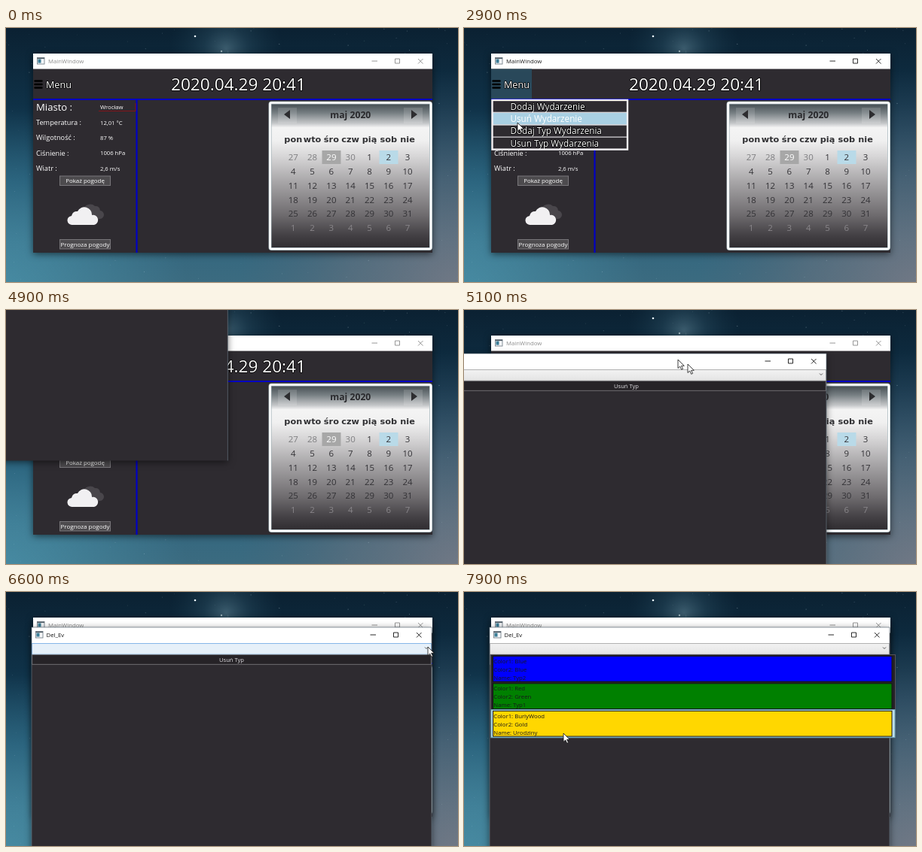
An HTML page that plays this animation: 600 px wide and 338 px high, repeating every 8 s.

```html
<!DOCTYPE html>
<html lang="pl">
<head>
<meta charset="utf-8">
<style>
html, body { margin: 0; width: 100%; height: 100%; overflow: hidden; background: #0c2333; }
svg { display: block; width: 100vw; height: 100vh; }
text { font-family: "Open Sans", "Noto Sans", sans-serif; white-space: pre; }
.days { font-family: "DejaVu Sans", sans-serif; font-weight: bold; }
.outlined { paint-order: stroke; stroke: #000; stroke-width: 1.6px; stroke-linejoin: round; }
.shadow { filter: drop-shadow(0 2px 5px rgba(0,0,0,.55)); }
</style>
</head>
<body>
<svg id="stage" viewBox="0 0 600 338" preserveAspectRatio="none"></svg>
<script>
const LOOP = 8000, STEP = 100;
const BODY = '#2e2b30';
const stage = document.getElementById('stage');

const rect = (x, y, w, h, fill, extra = '') =>
  `<rect x="${x}" y="${y}" width="${w}" height="${h}" fill="${fill}" ${extra}/>`;
const text = (x, y, size, label, fill = '#fff', extra = '') =>
  `<text x="${x}" y="${y}" font-size="${size}" fill="${fill}" ${extra}>${label}</text>`;
const line = (d, color, width = 1, extra = '') =>
  `<path d="${d}" fill="none" stroke="${color}" stroke-width="${width}" ${extra}/>`;
const group = (id, content, extra = '') => `<g id="${id}" ${extra}>${content}</g>`;
const stops = list => list.map(([at, color, alpha = 1]) =>
  `<stop offset="${at}" stop-color="${color}" stop-opacity="${alpha}"/>`).join('');
const vertical = (id, list) =>
  `<linearGradient id="${id}" x1="0" y1="0" x2="0" y2="1">${stops(list)}</linearGradient>`;
const radial = (id, cx, cy, r, list) =>
  `<radialGradient id="${id}" gradientUnits="userSpaceOnUse" cx="${cx}" cy="${cy}" r="${r}">${stops(list)}</radialGradient>`;
const MID = 'text-anchor="middle"';

function seeded(seed) {
  return () => (seed = (seed * 16807) % 2147483647) / 2147483647;
}

const defs = `<defs>
  ${vertical('sky', [[0, '#0b2132'], [.3, '#0f3147'], [.6, '#1e506b'], [.85, '#34677f'], [1, '#3b6b80']])}
  ${radial('teal', 0, 350, 240, [[0, '#4a93ab', .8], [1, '#4a93ab', 0]])}
  ${radial('dusk', 600, 345, 290, [[0, '#777a86', .9], [.5, '#68707d', .55], [1, '#526275', 0]])}
  ${radial('galaxy', 292, 28, 75, [[0, '#5c8192', .6], [.4, '#32596d', .35], [1, '#1a3d50', 0]])}
  ${vertical('calendar', [[0, '#3f484d'], [.07, '#777f83'], [.14, '#c4c6c8'], [.17, '#f4f4f4'], [.26, '#f0f0f0'],
    [.37, '#d6d5d6'], [.55, '#a5a3a5'], [.77, '#6e6b6e'], [.9, '#454246'], [1, '#2e2b2f']])}
  ${vertical('combo', [[0, '#f2f2f2'], [1, '#e4e4e4']])}
</defs>`;

function background() {
  const rand = seeded(77);
  const star = () => {
    const x = rand() * 600, y = rand() ** 1.4 * 338;
    return `<circle cx="${x.toFixed(1)}" cy="${y.toFixed(1)}" r="${(.25 + rand() * .35).toFixed(2)}" opacity="${(.15 + rand() * .4).toFixed(2)}"/>`;
  };
  const layers = ['sky', 'teal', 'dusk', 'galaxy'].map(id => rect(0, 0, 600, 338, `url(#${id})`)).join('');
  return layers + `<g fill="#cfe6ef">${Array.from({ length: 170 }, star).join('')}</g>
    <circle cx="251" cy="11" r="1.3" fill="#eef8fb"/>
    <circle cx="286" cy="31" r="1.2" fill="#c8dbe0" opacity=".7"/>`;
}

// Icon, title and the three window buttons, relative to the window corner.
function titleBar(title, titleX, color) {
  const icon = rect(5.5, 5.5, 9.5, 8.5, '#f4f6f8', 'stroke="#68747d" stroke-width=".8"') +
    rect(6.5, 7.5, 4, 5, '#3b7d96') + rect(5.5, 5.5, 9.5, 1.6, '#56636c');
  return icon + text(titleX, 13.2, 7.75, title, color) +
    line('M449.5 10h7.5M480.5 7h6v6h-6zM511 7l6.5 6.5M517.5 7l-6.5 6.5', color, .9);
}

function weatherPanel() {
  const rows = [
    ['Temperatura :', '12,01 °C', 129], ['Wilgotność :', '87 %', 149.3],
    ['Ciśnienie :', '1006 hPa', 169.7], ['Wiatr :', '2,6 m/s', 190]
  ];
  const button = (y, h, label, size) =>
    rect(71.5, y, 67, h, '#4d4b4e', 'stroke="#78767a" stroke-width="1"') + text(105, y + 9.2, size, label, '#fff', MID);
  return text(40, 110, 13.1, 'Miasto :') + text(125, 108.3, 7.7, 'Wrocław') +
    line('M123 110.5H172V100', '#8d1218', .9) +
    rows.map(([name, value, y]) => text(40, y, 9.2, name) + text(125, y - .5, 7.7, value)).join('') +
    button(197, 12.5, 'Pokaż pogodę', 7.9) + button(281.5, 12.5, 'Prognoza pogody', 8) +
    `<path d="M106 254a7 7 0 0 1-3-12a9 9 0 0 1 15-5a6 6 0 0 1 7 6a5.500 5.500 0 0 1-1 11z" fill="#49464b"/>
     <path d="M88 262a6 6 0 0 1-1-12a7 7 0 0 1 8-6a10 10 0 0 1 19 5a6.600 6.600 0 0 1 3 13z" fill="#f1f0f2"/>`;
}

function calendar() {
  const colX = i => 381.3 + i * 25.3;
  const names = ['pon', 'wto', 'śro', 'czw', 'pią', 'sob', 'nie'];
  let out = rect(350.5, 99.5, 213.5, 194.5, 'url(#calendar)', 'rx="2" stroke="#9fb0b6" stroke-width="4"') +
    rect(350.5, 99.5, 213.5, 194.5, 'none', 'rx="2" stroke="#fff" stroke-width="2.6"') +
    rect(361, 106, 25, 21, '#fff', 'opacity=".13"') + rect(528, 106, 25, 21, '#fff', 'opacity=".13"') +
    '<path d="M377 109v12l-8-6zM538 109v12l8-6z" fill="#2d2d30"/>' +
    text(457.3, 120.2, 12.2, 'maj 2020', '#29292c', MID + ' font-weight="bold"') +
    names.map((name, i) => text(colX(i), 152.3, 11.3, name, '#303033', MID + ' class="days"')).join('') +
    rect(419.5, 163, 25, 18, '#a7a7a7') + rect(495.5, 163, 25, 18, '#b9dae8');
  for (let i = 0; i < 42; i++) {
    const day = (i + 26) % 30 + 1;
    const label = i < 4 ? day : i < 35 ? i - 3 : i - 34;
    const color = i === 2 ? '#fff' : i < 4 ? '#7e7e80' : i < 35 ? '#333236' : '#89868a';
    out += text(colX(i % 7), 176.4 + Math.floor(i / 7) * 18.7, 11.5, label, color, MID);
  }
  return out;
}

function mainWindow() {
  return rect(36, 34, 530, 265, BODY, 'class="shadow"') + rect(36, 34, 530, 20.5, '#fff') +
    group('mainIdle', titleBar('MainWindow', 20, '#8c8c8c'), 'transform="translate(36 34)"') +
    group('mainActive', titleBar('MainWindow', 20, '#1a1a1a'), 'transform="translate(36 34)"') +
    rect(36, 54.5, 54, 39.5, '#29485a', 'id="menuHover"') +
    line('M38.500 70.500h9M38.500 75h9M38.500 79.500h9', '#000', 2.5, 'stroke-linecap="round"') +
    text(53, 80, 12.6, 'Menu', '#fff', 'class="outlined"') +
    text(308.5, 83, 22.6, '2020.04.29 20:41', '#fff', MID + ' class="outlined"') +
    line('M36 95H566M173.500 95V299', '#0000c4', 2.2) + weatherPanel() + calendar();
}

const menuLabels = ['Dodaj Wydarzenie', 'Usuń Wydarzenie', 'Dodaj Typ Wydarzenia', 'Usun Typ Wydarzenia'];
function menuPopup() {
  const top = i => 96 + i * 16.4;
  return rect(37.5, 96, 179.5, 65.6, BODY) +
    menuLabels.map((label, i) =>
      rect(38, top(i), 178.5, 16.4, '#a9d0e3', `id="pick${i}" stroke="#d9edf5" stroke-width="1"`) +
      text(61.5, top(i) + 12.5, 11.7, label, '#fff', `id="label${i}"`) +
      (i ? line(`M38 ${top(i)}H217`, '#d6d4d8', 1.2) : '')).join('') +
    rect(37.5, 96, 179.5, 65.6, 'none', 'stroke="#f2f0f3" stroke-width="2.4"');
}

function dialog() {
  return rect(0, 0, 531, 298, BODY, 'class="shadow"') + rect(0, 0, 531, 21.5, '#fff') +
    titleBar('Del_Ev', 19.5, '#111') +
    rect(.5, 21.5, 530, 14.5, 'url(#combo)', 'stroke="#acacac" stroke-width=".8"') +
    rect(.5, 21.5, 530, 14.5, '#e6f0f9', 'id="comboHover" stroke="#7eb4ea" stroke-width=".9"') +
    line('M522 26.500l2 2l2-2', '#555', 1) +
    rect(.7, 36.5, 529.6, 12.8, '#262327', 'stroke="#77757a" stroke-width=".9"') +
    text(265.5, 45.8, 7.6, 'Usuń Typ', '#e2e0e4', MID) +
    line('M0 298V0H531V298', '#66757f', .7);
}

const types = [['Blue', 'Blue', 'Typ2', '#0000ff'], ['Red', 'Green', 'Typ1', '#008000'], ['BurlyWood', 'Gold', 'Urodziny', '#ffd700']];
function typeList() {
  return rect(35.5, 83.5, 537, 110.5, '#242126', 'stroke="#55525a" stroke-width="1"') +
    types.map(([first, second, name, fill], i) => {
      const y = 85.3 + i * 36.5;
      const lines = [`Color1: ${first}`, `Color2: ${second}`, `Name: ${name}`];
      return rect(36, y - 1.7, 536, 37, '#bfdfe9', `id="type${i}" stroke="#69a9c0" stroke-width="1"`) +
        rect(38.5, y, 529.5, 33.8, fill, 'stroke="#141414" stroke-width="1"') +
        lines.map((label, n) => text(39.3, y + 9.6 + n * 11, 7.75, label, '#17171c')).join('');
    }).join('');
}

const arrow = '<path d="M0 0v11.500l2.700-2.500l2 4.300l1.900-.9l-2-4.100h3.700z" fill="#fff" stroke="#111" stroke-width=".8"/>';

stage.innerHTML = defs + background() + mainWindow() + group('menu', menuPopup()) +
  group('dialog', dialog()) + group('list', typeList()) + group('ghost', arrow) + group('cursor', arrow);

const cursorPath = [
  [1200, 290, 350], [1900, 158, 114], [2300, 62, 78], [2500, 62, 82], [2900, 71, 126], [3400, 81, 152],
  [3900, 83, 153], [4400, 45, -138], [4800, 45, -138], [5100, 297, 72], [5500, 381, 61], [5800, 381, 61],
  [6400, 558, 74], [6600, 560, 73], [6800, 560, 74], [7300, 260, 104], [7900, 132, 188]
];
const dialogPath = [[4800, -302, -152], [5100, -50, 58], [5500, 34, 47]];

function along(path, t) {
  const next = path.findIndex(key => key[0] > t);
  if (next === 0) return path[0].slice(1);
  if (next < 0) return path[path.length - 1].slice(1);
  const [t0, x0, y0] = path[next - 1], [t1, x1, y1] = path[next];
  const u = (t - t0) / (t1 - t0), k = u * u * (3 - 2 * u);
  return [x0 + (x1 - x0) * k, y0 + (y1 - y0) * k];
}

const el = id => document.getElementById(id);
const show = (id, on) => el(id).setAttribute('visibility', on ? 'visible' : 'hidden');
const place = (id, [x, y], scale = 1) => el(id).setAttribute('transform', `translate(${x} ${y}) scale(${scale})`);
const between = (t, a, b) => t >= a && t < b;

function draw(t) {
  const [cx, cy] = along(cursorPath, t);
  const menuOpen = between(t, 2400, 3600), listOpen = t >= 6800;
  place('cursor', [cx, cy]);
  place('ghost', [cx - 13, cy - 6]);
  show('ghost', between(t, 5100, 5200));

  show('mainActive', menuOpen);
  show('mainIdle', !menuOpen);
  show('menuHover', menuOpen || (between(t, 2100, 2400) && cx < 90 && cy < 94));
  show('menu', menuOpen);
  menuLabels.forEach((_, i) => {
    const picked = menuOpen && Math.floor((cy - 96) / 16.4) === i;
    show('pick' + i, picked);
    el('label' + i).setAttribute('class', picked ? '' : 'outlined');
  });

  const [dx, dy] = along(dialogPath, t);
  const grow = Math.min(1, Math.max(0, (t - 3600) / 200));
  const scale = .9 + .1 * grow;
  place('dialog', [dx + 265 * (1 - scale), dy + 149 * (1 - scale)], scale);
  el('dialog').setAttribute('opacity', grow);
  show('dialog', t > 3600);
  show('comboHover', t > 5800 && between(cy, 68.5, 83));
  if (t <= 3600) show('comboHover', false);

  show('list', listOpen);
  types.forEach((_, i) => show('type' + i, listOpen && Math.floor((cy - 83.6) / 36.5) === i));
}

const start = performance.now();
function tick(now) {
  const t = Math.max(0, now - start) % LOOP;
  draw(Math.floor(t / STEP) * STEP);
  requestAnimationFrame(tick);
}
draw(0);
requestAnimationFrame(tick);
</script>
</body>
</html>
```
